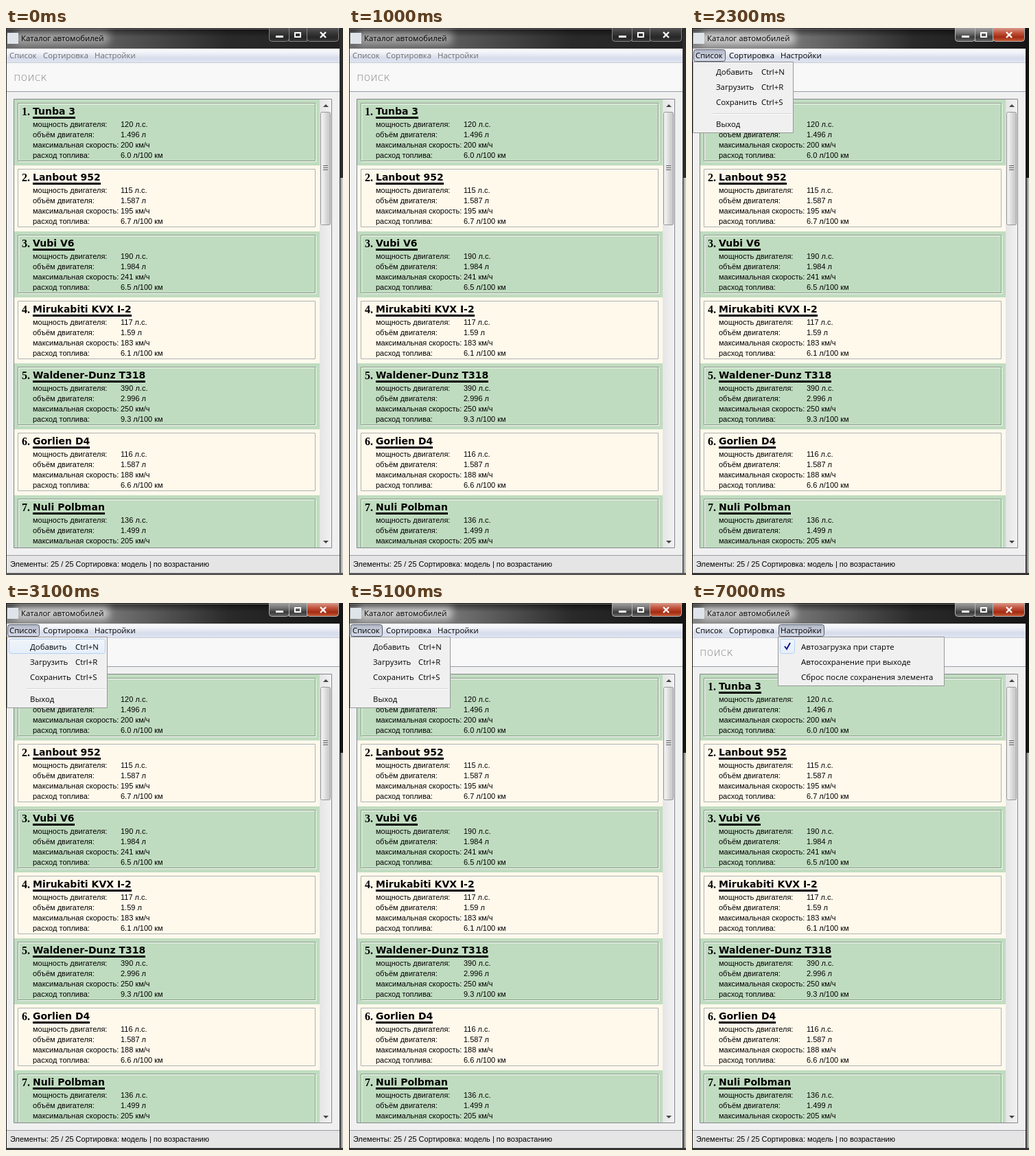
Animation of 491x796 px, one loop 8 s. Source, as an HTML page with a canvas:

```html
<!DOCTYPE html>
<html lang="ru">
<head>
<meta charset="utf-8">
<title>Каталог автомобилей</title>
<style>
html, body { margin: 0; width: 100%; height: 100%; overflow: hidden; }
canvas { display: block; }
</style>
</head>
<body>
<canvas id="stage" width="491" height="796"></canvas>
<script>
const ctx = document.getElementById('stage').getContext('2d');
const LOOP = 8000;
const WIDE = '"DejaVu Sans", Verdana, sans-serif';
const UI = '11.4px "Open Sans", "Noto Sans", sans-serif';
const SMALL = '11px "Liberation Sans", Arial, sans-serif';
const NAME = 'bold 14px ' + WIDE, HINT = '200 16px ' + WIDE;
const NUMBER = 'bold 16px "Liberation Serif", serif';

const labels = ['мощность двигателя:', 'объём двигателя:', 'максимальная скорость:', 'расход топлива:'];
const units = [' л.с.', ' л', ' км/ч', ' л/100 км'];
const cars = [
  ['Tunba 3', '120', '1.496', '200', '6.0'],
  ['Lanbout 952', '115', '1.587', '195', '6.7'],
  ['Vubi V6', '190', '1.984', '241', '6.5'],
  ['Mirukabiti KVX I-2', '117', '1.59', '183', '6.1'],
  ['Waldener-Dunz T318', '390', '2.996', '250', '9.3'],
  ['Gorlien D4', '116', '1.587', '188', '6.6'],
  ['Nuli Polbman', '136', '1.499', '205', '6.3']
];

// null is a separator
const menus = [
  { title: 'Список', tab: [2, 47], x: 1, w: 147, h: 104, textX: 35, keyX: 101,
    items: [['Добавить', 'Ctrl+N'], ['Загрузить', 'Ctrl+R'], ['Сохранить', 'Ctrl+S'], null, ['Выход']] },
  { title: 'Сортировка', tab: [51, 73], x: 50, w: 221, h: 192, textX: 84, keyX: 225, radios: [74, 194],
    items: [['марка', '1'], ['модель', '2'], ['мощность', '3'], ['объем двигателя', '4'],
      ['максимальная скорость', '5'], ['расход топлива', '6'], null,
      ['по возрастанию', 'Equals'], ['по убыванию', 'Minus']] },
  { title: 'Настройки', tab: [126, 67], x: 125, w: 243, h: 72, textX: 159, check: 52,
    items: [['Автозагрузка при старте'], ['Автосохранение при выходе'], ['Сброс после сохранения элемента']] }
];

// [start, open menu, highlighted item]
const steps = [[2300, 0, -1], [3100, 0, 0], [3400, 0, 1], [3900, 0, 2],
  [4700, 0, 0], [5100, 0, -1], [5200, 1, -1], [7000, 2, -1]];

function rect(x, y, w, h, fill) {
  ctx.fillStyle = fill;
  ctx.fillRect(x, y, w, h);
}

function fade(x0, y0, x1, y1, ...colors) {
  const g = ctx.createLinearGradient(x0, y0, x1, y1);
  colors.forEach((c, i) => g.addColorStop(i / (colors.length - 1), c));
  return g;
}

function box(x, y, w, h, stroke, fill, r = 0) {
  ctx.beginPath();
  ctx.roundRect(x + .5, y + .5, w - 1, h - 1, r);
  if (fill) { ctx.fillStyle = fill; ctx.fill(); }
  ctx.strokeStyle = stroke;
  ctx.lineWidth = 1;
  ctx.stroke();
}

function text(s, x, y, font = UI, color = '#000') {
  ctx.font = font;
  ctx.fillStyle = color;
  ctx.fillText(s, x, y);
}

function poly(points, color) {
  ctx.beginPath();
  points.forEach(p => ctx.lineTo(...p));
  ctx.fillStyle = color;
  ctx.fill();
}

function line(points, color, width) {
  ctx.beginPath();
  points.forEach(p => ctx.lineTo(...p));
  ctx.strokeStyle = color;
  ctx.lineWidth = width;
  ctx.stroke();
}

function drawFrame(active, glow) {
  rect(0, 0, 491, 796, active ? '#151515' : '#2c2c2c');
  rect(487, 218, 4, 578, active ? fade(487, 0, 491, 0, '#5a5a5a', '#d0d0d0')
    : fade(487, 0, 491, 0, '#888', '#dcdcdc'));
  rect(0, 793, 491, 3, active ? '#333' : '#555');
  rect(1, 1, 485, 29, active ? fade(0, 0, 486, 0, '#858585', '#707070', '#2a2a2a', '#161616')
    : fade(0, 0, 486, 0, '#6c6c6c', '#585858', '#2a2a2a', '#222'));
  rect(1, 1, 485, 12, fade(0, 1, 0, 13, 'rgba(0,0,0,.5)', 'rgba(0,0,0,0)'));
  rect(1, 1, 485, 1, '#6a6a6a');

  // soft glow behind the caption
  ctx.save();
  ctx.filter = 'blur(6px)';
  rect(14, 6, 136, 18, active ? 'rgba(230,230,230,.8)' : 'rgba(190,190,190,.7)');
  ctx.restore();
  rect(2, 7, 16, 16, '#dfe4ea');
  text('Каталог автомобилей', 22, 19);

  const button = active ? fade(0, 0, 0, 20, '#a0a0a0', '#777', '#3c3c3c', '#686868')
    : fade(0, 0, 0, 20, '#555', '#3b3b3b', '#262626', '#3a3a3a');
  const close = active ? fade(0, 0, 0, 20, '#d79b8d', '#c4563f', '#a32b12', '#c9643f') : button;
  const edge = active ? '#b4b4b4' : '#858585';
  box(383, -4, 30, 24, edge, button, 4);
  box(412, -4, 27, 24, edge, button);
  box(438, -4, 47, 24, edge, close, 4);
  if (glow) rect(439, 0, 45, 19, 'rgba(190,70,45,.25)');
  rect(393, 11, 11, 3, '#fff');
  ctx.strokeStyle = '#fff';
  ctx.lineWidth = 2;
  ctx.strokeRect(421, 7, 8, 6);
  line([[458, 6], [466, 14]], '#fff', 2.4);
  line([[466, 6], [458, 14]], '#fff', 2.4);
}

function drawMenuBar(active, open) {
  rect(1, 30, 485, 20, fade(0, 30, 0, 50, '#fff', '#eef0f7', '#d8ddec', '#dfe4f1'));
  menus.forEach((m, i) => {
    const [x, w] = m.tab;
    if (i === open) box(x, 31, w, 18, '#565c6b', fade(0, 31, 0, 49, '#aeb4c3', '#c9cedc', '#d5dae8'), 3);
    else if (active && open < 0 && i === 0) box(x, 31, w, 18, '#8f95a5', fade(0, 31, 0, 49, '#fafbfd', '#d9deeb'), 3);
    text(m.title, x + 3, 44, UI, active ? '#000' : '#6d6d6d');
  });
}

function drawCar(car, i) {
  const y = 104 + i * 96;
  const [fill, shade] = i % 2 ? ['#fff9ec', '#b2aea5'] : ['#c0dcc0', '#869a86'];
  rect(12, y, 445, 96, fill);
  box(18, y + 6, 434, 85, '#fff');
  box(17, y + 5, 434, 85, shade);
  text(i + 1 + '.', 23, y + 23, NUMBER);
  text(car[0], 39, y + 22, NAME);
  rect(39, y + 25, Math.round(ctx.measureText(car[0]).width), 3, '#000');
  labels.forEach((label, k) => {
    text(label, 39, y + 40 + k * 15, SMALL);
    text(car[k + 1] + units[k], 167, y + 40 + k * 15, SMALL);
  });
}

function drawScrollbar() {
  rect(457, 104, 17, 652, fade(457, 0, 474, 0, '#e5e5e5', '#f2f2f2'));
  poly([[462, 115], [470, 115], [466, 111]], '#444');
  poly([[462, 746], [470, 746], [466, 750]], '#444');
  box(458, 122, 15, 165, '#979797', fade(458, 0, 473, 0, '#f5f5f5', '#e9e9e9', '#d2d2d4', '#c5c5c8'), 2);
  for (let y = 200; y < 208; y += 3) {
    rect(462, y, 7, 1, '#555');
    rect(462, y + 1, 7, 1, '#eee');
  }
}

function drawContent() {
  rect(1, 50, 485, 743, '#f0f0f0');
  rect(1, 50, 485, 42, '#f8f8f8');
  rect(1, 50, 485, 1, '#c9ccd4');
  rect(1, 92, 485, 1, '#989da8');
  text('поиск', 11, 77, HINT, '#858585');

  box(11, 103, 464, 654, '#828790');
  ctx.save();
  ctx.beginPath();
  ctx.rect(12, 104, 462, 652);
  ctx.clip();
  cars.forEach(drawCar);
  drawScrollbar();
  ctx.restore();

  rect(1, 767, 485, 26, '#e5e5e5');
  rect(1, 767, 485, 1, '#989da8');
  text('Элементы: 25 / 25 Сортировка: модель | по возрастанию', 6, 784, SMALL);
}

function highlight(x, y, w) {
  box(x, y, w, 22, '#b4d2f3', fade(0, y, 0, y + 22, '#f1f5fa', '#e4eefa'), 3);
}

function drawPopup(m, selected) {
  box(m.x, 49, m.w, m.h, '#979797', '#f0f0f0');
  if (selected >= 0) highlight(4, 52 + selected * 22, 141);
  let y = 68;
  for (const item of m.items) {
    if (item) {
      text(item[0], m.textX, y);
      if (item[1]) text(item[1], m.keyX, y);
      y += 22;
    } else {
      rect(m.x + 29, y - 10, m.w - 32, 1, '#d5d5d5');
      rect(m.x + 29, y - 9, m.w - 32, 1, '#fff');
      y += 10;
    }
  }
  for (const top of m.radios || []) {
    highlight(53, top, 22);
    const g = ctx.createRadialGradient(63, top + 10, 0, 64, top + 11, 4);
    g.addColorStop(0, '#b0b4e8');
    g.addColorStop(.5, '#4a4f9e');
    g.addColorStop(1, '#1c205c');
    ctx.beginPath();
    ctx.arc(64, top + 11, 4, 0, 7);
    ctx.fillStyle = g;
    ctx.fill();
  }
  if (m.check) {
    highlight(128, m.check, 22);
    line([[135, 63], [138, 67], [143, 58]], '#14148c', 2);
  }
}

function draw(t) {
  const active = t >= 2200;
  const [, open, selected] = steps.findLast(s => t >= s[0]) || [0, -1, -1];
  drawFrame(active, t >= 900 && t < 1000);
  drawContent();
  drawMenuBar(active, open);
  if (open >= 0) drawPopup(menus[open], selected);
}

const start = performance.now();
function tick() {
  draw((performance.now() - start) % LOOP);
  requestAnimationFrame(tick);
}
tick();
</script>
</body>
</html>
```
